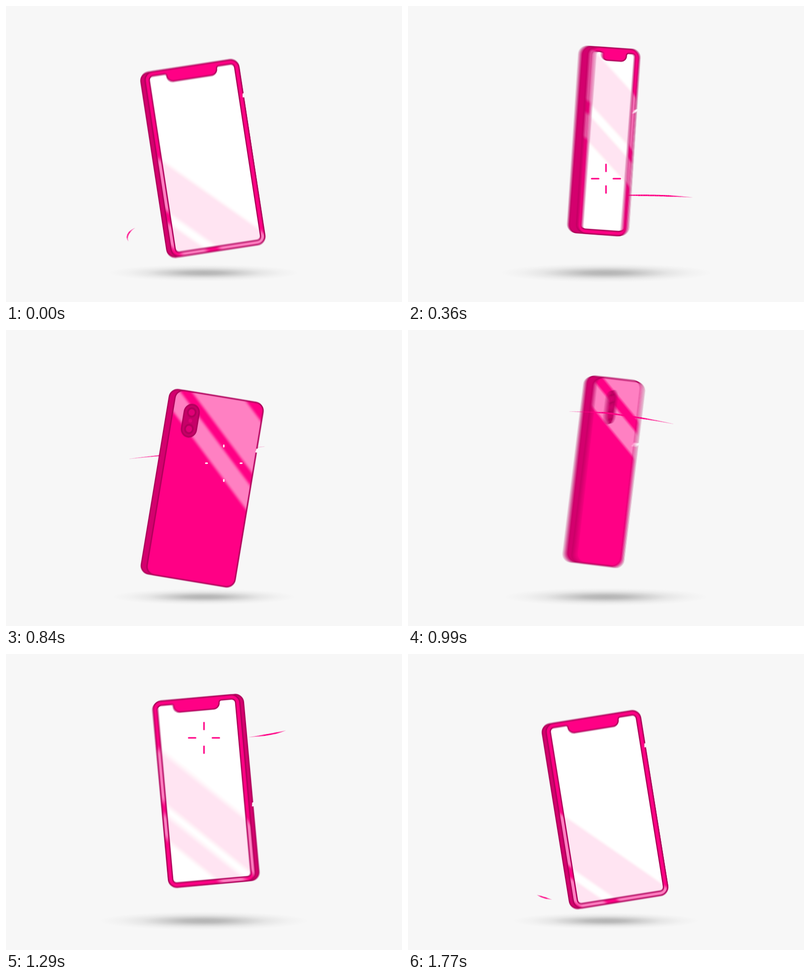
An HTML page with a canvas for the animation above (1.8 s loop, 800x600 px).

```html
<!DOCTYPE html>
<html lang="en">
<head>
<meta charset="utf-8">
<title>Spinning phone</title>
<style>
html, body { margin: 0; width: 100%; height: 100%; overflow: hidden; background: #f7f7f7; }
canvas { display: block; width: 800px; height: 600px; }
</style>
</head>
<body>
<canvas id="stage" width="800" height="600"></canvas>
<script>
const LOOP = 1800, STEP = 30, SHUTTER = 15, SAMPLES = 7;
const PINK = '#ff0085', SIDE = '#d4006e', LINE = '#b0005b', PAPER = '#f7f7f7';
const HEIGHT = 381, WIDTH = 200, BEZEL = 9.75;
const RAD = Math.PI / 180;

const out = document.getElementById('stage').getContext('2d');
const layer = document.createElement('canvas');
layer.width = 800;
layer.height = 600;
const c = layer.getContext('2d');

// Tables of [time, value]; time runs from -270 to 1530.
const YAW = [[-270, 8], [-30, 12], [0, 14], [360, 59], [450, 100], [540, 160], [630, 193],
  [720, 198], [870, 208], [990, 240], [1080, 288], [1170, 318], [1290, 333], [1410, 354], [1530, 368]];
const SHINE = [[-270, 93], [-30, 85], [0, 77], [360, -141], [630, -168], [990, -263],
  [1100, -210], [1290, -11], [1530, 93]];
const GLINT = [[-270, -118], [0, -114], [360, -64], [630, -113], [990, -61], [1290, 36], [1530, -118]];
const HEAD = [[-30, 64], [0, 117], [360, 597], [630, 1062], [990, 1463], [1290, 1687], [1530, 2173]];
const TAIL = [[-30, 45], [0, 80], [360, 540], [630, 965], [990, 1396], [1290, 1650], [1530, 2164]];
// Spiral shape by turn angle.
const RISE = [[64, 473], [100, 468], [590, 401], [1000, 345], [1440, 181], [1670, 149], [2170, 102]];
const RADIUS = [[64, 155], [100, 155], [590, 207], [1000, 246], [1440, 190], [1670, 180], [2170, 150]];
const DEPTH = [[64, 35], [100, 35], [590, 22], [1000, 21], [1440, -13], [1670, -20], [2170, -10]];
// Tap marks: start, x, y, colour.
const TAPS = [[235, 400, 350, PINK], [580, 440, 270, '#fff'], [1148, 400, 170, PINK]];

const wrap = t => {
  t = (t + LOOP) % LOOP;
  return t > 1530 ? t - LOOP : t;
};

function find(table, t) {
  let i = 0;
  while (i < table.length - 2 && t > table[i + 1][0]) i++;
  return i;
}

function linear(table, t) {
  const i = find(table, t), [t0, v0] = table[i], [t1, v1] = table[i + 1];
  const k = Math.min(1, Math.max(0, (t - t0) / (t1 - t0)));
  return v0 + (v1 - v0) * k;
}

function smooth(table, t) {
  const rate = i => (table[i + 1][1] - table[i][1]) / (table[i + 1][0] - table[i][0]);
  const last = table.length - 2;
  const slope = i => (rate(Math.max(0, i - 1)) + rate(Math.min(last, i))) / 2;
  const i = find(table, t), [t0, v0] = table[i], [t1, v1] = table[i + 1];
  const d = t1 - t0, k = (t - t0) / d, k2 = k * k, k3 = k2 * k;
  return v0 * (2 * k3 - 3 * k2 + 1) + v1 * (3 * k2 - 2 * k3) +
    d * (slope(i) * (k3 - 2 * k2 + k) + slope(i + 1) * (k3 - k2));
}

function height(t) {
  const a = (t - 715) * 0.4 * RAD;
  return 299 + 31 * Math.cos(a) - 2 * Math.cos(3 * a);
}

function tilt(t) {
  const a = (t - 715) * 0.2 * RAD;
  return (10.6 * Math.cos(a) - 0.7 * Math.cos(3 * a)) * RAD;
}

function box(x, y, w, h, r) {
  c.beginPath();
  c.roundRect(x, y, w, h, Math.max(0, Math.min(r, w / 2, h / 2)));
}

function paint(fill, line, width = 2.6) {
  if (fill) { c.fillStyle = fill; c.fill(); }
  if (line) { c.strokeStyle = line; c.lineWidth = width; c.stroke(); }
}

function shadow(t) {
  const rx = 183 + (326 - height(t)) * 0.615;
  c.save();
  c.translate(400, 541);
  c.scale(rx, rx * 0.09);
  const g = c.createRadialGradient(0, 0, 0, 0, 0, 1);
  [1, 0.87, 0.54, 0.25, 0.08, 0].forEach((a, i) => g.addColorStop(i / 5, `rgba(0,0,0,${a * 0.27})`));
  c.fillStyle = g;
  c.fillRect(-1, -1, 2, 2);
  c.restore();
}

function spiral(a) {
  const r = a * RAD;
  return [400 - linear(RADIUS, a) * Math.sin(r), linear(RISE, a) + linear(DEPTH, a) * Math.cos(r)];
}

function trail(ctx, t, front) {
  if (t < -30) return;
  const a = linear(TAIL, t), b = linear(HEAD, t), n = 40;
  ctx.save();
  ctx.strokeStyle = PINK;
  for (let i = 0; i < n; i++) {
    const k = (i + 0.5) / n, p = a + (b - a) * i / n, q = a + (b - a) * (i + 1) / n;
    if ((Math.cos((p + q) / 2 * RAD) > 0) !== front) continue;
    const fade = Math.min(1, 3 * k, 3 * (1 - k));
    ctx.globalAlpha = 0.15 + 0.85 * fade;
    ctx.lineWidth = 1 + 2 * fade;
    ctx.beginPath();
    ctx.moveTo(...spiral(p));
    ctx.lineTo(...spiral(q));
    ctx.stroke();
  }
  ctx.restore();
}

// Two slanted light bands, starting at height u on the centre line.
function bands(u, rgb, alpha) {
  const nx = -Math.sin(44 * RAD), ny = Math.cos(44 * RAD);
  const d = u * ny - 3, len = 137;
  const g = c.createLinearGradient(nx * d, ny * d, nx * (d + len), ny * (d + len));
  [[0, 0], [6, 1], [77, 1], [83, 0], [95, 0], [101, 1], [131, 1], [137, 0]]
    .forEach(([at, a]) => g.addColorStop(at / len, `rgba(${rgb},${a * alpha})`));
  c.fillStyle = g;
  c.fillRect(-300, -300, 600, 600);
}

function screenPath(w) {
  const l = -w / 2 + BEZEL, r = -l, b = HEIGHT / 2 - BEZEL, top = -b;
  const nw = (r - l) * 0.29, low = -HEIGHT / 2 + 26.5;
  const k = Math.min(1, w / 120), R = 8 * k, f = 5 * k, n = 12 * k;
  c.beginPath();
  c.moveTo(l + R, top);
  c.lineTo(-nw - f, top);
  c.arcTo(-nw, top, -nw, top + f, f);
  c.arcTo(-nw, low, -nw + n, low, n);
  c.arcTo(nw, low, nw, low - n, n);
  c.arcTo(nw, top, nw + f, top, f);
  c.arcTo(r, top, r, b, R);
  c.arcTo(r, b, l, b, R);
  c.arcTo(l, b, l, top, R);
  c.arcTo(l, top, r, top, R);
  c.closePath();
}

function camera(w) {
  c.save();
  c.translate(-58 + (195 - w) * 0.5, -131);
  c.scale(w / 195, 1);
  box(-16, -33, 32, 66, 16);
  paint('#c60068', LINE, 3);
  for (const y of [-17, 17]) {
    c.beginPath();
    c.arc(0, y, 8.5, 0, 7);
    paint('#e00076', LINE, 3.5);
  }
  c.beginPath();
  c.arc(0, 0, 4, 0, 7);
  paint('#e00076');
  c.restore();
}

function phone(t) {
  const yaw = smooth(YAW, t) * RAD, twist = Math.sin(2 * yaw), front = Math.cos(yaw) > 0;
  const w = WIDTH * Math.abs(Math.cos(yaw));
  const thick = (twist < 0 ? 20 + 10 * twist : 20) * Math.abs(Math.sin(yaw)) ** 0.6;
  const total = w + thick, top = -HEIGHT / 2 + 1.3, tall = HEIGHT - 2.6;
  const u = smooth(SHINE, t);

  c.save();
  c.translate(400 - 5 * twist, height(t));
  c.rotate(tilt(t));
  box(-total / 2 + 1.3, top, total - 2.6, tall, 17);
  paint(SIDE, LINE);

  c.save();
  c.translate(twist > 0 ? thick / 2 : -thick / 2, 0);
  if (w > 6) {
    box(-w / 2 + 1.3, top, w - 2.6, tall, 17);
    paint(PINK);
    c.save();
    c.clip();
    bands(u, '255,255,255', 0.5);
    c.restore();
    box(-w / 2 + 1.3, top, w - 2.6, tall, 17);
    paint(null, LINE);
    if (!front) camera(w);
    else if (w > 34) {
      screenPath(w);
      paint('#fff');
      c.save();
      c.clip();
      bands(u, '255,0,133', 0.105);
      c.restore();
      screenPath(w);
      paint(null, LINE);
    }
  }
  c.restore();

  const y = smooth(GLINT, t), slant = w < 140 ? 4 : 0.5;
  c.beginPath();
  c.moveTo(total / 2 - 1 - slant, y + 4);
  c.lineTo(total / 2 - 0.5 + slant / 4, y - 4);
  paint(null, '#fff', 3.2);
  c.restore();
}

function tap(t, [start, x, y, color]) {
  const k = (t - start) / 300;
  if (k <= 0 || k >= 1) return;
  const outer = 38 * (1 - (1 - k) ** 3) - 1.5, inner = 38 * k ** 1.2 + 1.5;
  if (outer <= inner) return;
  out.beginPath();
  for (const [dx, dy] of [[1, 0], [-1, 0], [0, 1], [0, -1]]) {
    out.moveTo(x + dx * inner, y + dy * inner);
    out.lineTo(x + dx * outer, y + dy * outer);
  }
  out.strokeStyle = color;
  out.lineWidth = 3;
  out.lineCap = 'round';
  out.stroke();
  out.lineCap = 'butt';
}

function draw(t) {
  // Average several moments for motion blur.
  for (let i = 0; i < SAMPLES; i++) {
    c.fillStyle = PAPER;
    c.fillRect(0, 0, 800, 600);
    shadow(t);
    trail(c, t, false);
    phone(wrap(t + SHUTTER * (i / (SAMPLES - 1) - 0.5)));
    out.globalAlpha = 1 / (i + 1);
    out.drawImage(layer, 0, 0);
  }
  out.globalAlpha = 1;
  trail(out, t, true);
  TAPS.forEach(item => tap(t, item));
}

let shown = -1;
function tick() {
  const t = Math.floor(performance.now() % LOOP / STEP) * STEP;
  if (t !== shown) draw(wrap(shown = t));
  requestAnimationFrame(tick);
}
tick();
</script>
</body>
</html>
```
